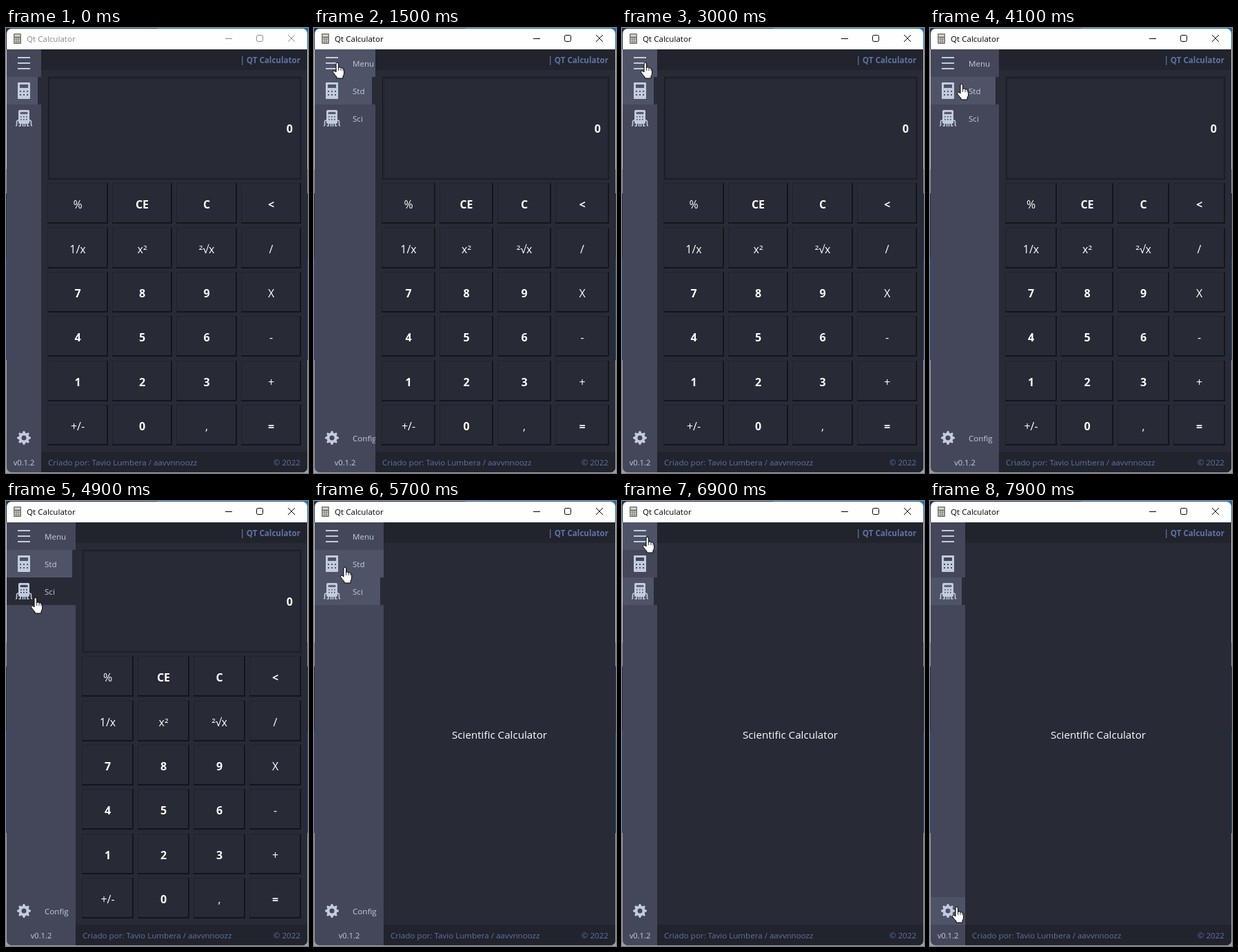
These frames come from a looping animation (438 by 646 pixels, 8000 ms). An HTML page:

```html
<!DOCTYPE html>
<html lang="pt">
<head>
<meta charset="utf-8">
<title>Qt Calculator</title>
<style>
  html, body { margin: 0; width: 100%; height: 100%; overflow: hidden; background: #1d3a5c; }
  svg { display: block; font-family: "Open Sans", "Noto Sans", sans-serif; font-size: 11.6px; }
  text { white-space: pre; }
</style>
</head>
<body>
<svg id="stage" width="438" height="646" viewBox="0 0 438 646"></svg>
<script>
const LOOP = 8000, TICK = 100, SLIDE = 280, PRESS = 25, SWITCH = 5000;
const C = {
  page: '#282a36', bar: '#21232d', side: '#44475a', lit: '#4f5368',
  icon: '#c3ccdf', label: '#6272a4', edge: '#14151b', soft: '#20222c'
};

const clicks = [
  { at: 1400, item: 'Menu', width: 100 },
  { at: 2600, item: 'Menu', width: 50 },
  { at: 3870, item: 'Menu', width: 100 },
  { at: 4900, item: 'Sci', width: 100 },
  { at: 6600, item: 'Menu', width: 50 }
];

// Each move runs from the place before it; bow bends it sideways
const moves = [
  { from: 0, to: 400, x: 33, y: 59 },
  { from: 500, to: 700, x: 33, y: 51 },
  { from: 3800, to: 4100, x: 45, y: 82 },
  { from: 4100, to: 4700, x: 42, y: 141 },
  { from: 5500, to: 5900, x: 36, y: 53, bow: 5 },
  { from: 7000, to: 7900, x: 38, y: 590, bow: 11 }
];

const menu = [['Menu', 31], ['Std', 71], ['Sci', 111], ['Config', 575]];
const keys = '% CE C < 1/x x² ²√x / 7 8 9 X 4 5 6 - 1 2 3 + +/- 0 , ='.split(' ');

const clamp = v => Math.min(1, Math.max(0, v));
const mix = (a, b, p) => a + (b - a) * p;
const outCirc = p => Math.sqrt(1 - (p - 1) ** 2);
const smooth = p => p * p * (3 - 2 * p);

const sideWidth = t => Math.round(clicks.reduce(
  (w, c) => mix(w, c.width, outCirc(clamp((t - c.at) / SLIDE))), 50));

function pointerAt(t) {
  let x = 18, y = 0;
  for (const m of moves) {
    const p = smooth(clamp((t - m.from) / (m.to - m.from)));
    x = mix(x, m.x, p) + (m.bow || 0) * Math.sin(Math.PI * p);
    y = mix(y, m.y, p);
  }
  return [Math.round(x), Math.round(y)];
}

const rect = (x, y, w, h, fill, more = '') =>
  `<rect x="${x}" y="${y}" width="${w}" height="${h}" fill="${fill}" ${more}/>`;
const path = (d, fill, more = '') => `<path d="${d}" fill="${fill}" ${more}/>`;
const text = (x, y, s, fill, more = '') =>
  `<text x="${x}" y="${y}" fill="${fill}" ${more}>${s.replace('<', '&lt;')}</text>`;
const middle = 'text-anchor="middle"', end = 'text-anchor="end"';
const bold = 'font-weight="700"';

const dots = (xs, ys, size, fill) =>
  ys.map(y => xs.map(x => rect(x, y, size, size, fill)).join('')).join('');

function gear(cx, cy) {
  const pts = [];
  for (let i = 0; i < 32; i++) {
    const tooth = i % 4 === 1 || i % 4 === 2;
    const angle = (Math.floor(i / 4) + (i % 4 - 1.5) / 4) * Math.PI / 4;
    const r = tooth ? 10 : 7.5;
    pts.push(`${(cx + r * Math.cos(angle)).toFixed(2)} ${(cy + r * Math.sin(angle)).toFixed(2)}`);
  }
  const hole = `M${cx - 3.5} ${cy}a3.5 3.5 0 1 0 7 0a3.5 3.5 0 1 0-7 0z`;
  return path(`M${pts.join('L')}Z${hole}`, C.icon, 'fill-rule="evenodd"');
}

const icons = {
  Menu: () => [42, 50, 58].map(y => rect(17, y, 18, 2, C.icon)).join(''),
  Std: bg => rect(17, 79, 18, 24, C.icon, 'rx="1"') + rect(20, 82, 12, 5, bg) +
    dots([20, 25, 30], [91, 96], 2, bg),
  Sci: bg => rect(18, 119, 16, 20, C.icon, 'rx="2"') +
    rect(20.5, 122, 11, 3, bg, 'rx="1.5"') + dots([22.5, 25.5, 28.5], [123], 1, C.icon) +
    dots([21, 25, 29], [128, 132], 1.6, bg) +
    path('M18 134Q15 134 15.5 138T14 142M34 134Q37 134 36.5 138T38 142M21 138V142H18.5M24.5 138V143M27.5 138V143M31 138V142H33.5',
      'none', `stroke="${C.icon}" stroke-width="1.6"`),
  Config: () => gear(26, 595)
};

function desktop() {
  const bands = [[31, '#c3c8cc'], [205, '#8d949c'], [240, '#24344f'], [334, '#1f4e85'], [482, '#9aa2a9']];
  return rect(0, 0, 219, 31, '#1d3a5c') + rect(219, 0, 219, 31, '#1b6fb8') +
    bands.map(([y, c]) => rect(0, y, 438, 646 - y, c)).join('');
}

function titleBar(focused) {
  const ink = focused ? '#000' : '#8a8a8a';
  const line = `stroke="${ink}"`;
  return rect(1, 1, 436, 30, '#fefefe') +
    rect(11, 8, 11, 15, '#77776f', 'rx="1"') + rect(12.5, 9.5, 8, 3, '#d7ddcf') +
    dots([12.5, 15.5, 18.5], [14.5, 17, 19.5], 1.8, '#e8e8e4') +
    text(30, 20, 'Qt Calculator', ink) +
    path('M318 15.5H328', 'none', line) +
    rect(363.5, 10.5, 9, 9, 'none', `rx="2" ${line}`) +
    path('M409 10L419 20M419 10L409 20', 'none', line);
}

function sidebar(w, active, pressed, hovered) {
  const items = menu.map(([name, y]) => {
    const dark = name === pressed, on = name === active;
    const bg = dark ? C.page : on || name === hovered ? C.lit : C.side;
    return rect(1, y, w, 40, bg) +
      (on && !dark ? rect(w - 4, y, 5, 40, C.page) : '') +
      icons[name](bg) +
      (w > 55 ? text(56, y + 25, name, C.icon) : '');
  }).join('');
  return `<clipPath id="side"><rect x="1" y="31" width="${w}" height="614"/></clipPath>` +
    `<g clip-path="url(#side)">${rect(1, 31, w, 614, C.side)}${items}` +
    text(1 + w / 2, 635, 'v0.1.2', C.icon, `${middle} font-size="11.2"`) + '</g>';
}

function keypad(w) {
  const x0 = w + 10, step = (434 - x0) / 4;
  const display = rect(x0 + 1.5, 71.5, 426 - x0, 148, 'none', `stroke="${C.edge}"`) +
    rect(x0 + 3.5, 73.5, 422 - x0, 144, 'none', `stroke="${C.soft}"`) +
    text(416, 152, '0', '#fff', `${end} ${bold} font-size="16"`);
  return display + keys.map((key, i) => {
    const left = x0 + (i % 4) * step;
    const x = Math.round(left), kw = Math.round(left + step - 6) - x;
    const y = Math.round(225.4 + Math.floor(i / 4) * 64.3);
    const weight = /^([0-9]|CE|C|<|=)$/.test(key) ? bold : '';
    return rect(x, y, kw, 59, C.edge) + rect(x, y, kw - 2, 57, C.soft) +
      rect(x + 1, y + 1, kw - 3, 56, C.page) +
      text(x + kw / 2, y + 37, key, '#fff', `${middle} font-size="16" ${weight}`);
  }).join('');
}

function page(w, scientific) {
  const x = w + 1;
  return rect(x, 31, 437 - x, 614, C.page) +
    rect(x, 31, 437 - x, 30, C.bar) + rect(x, 615, 437 - x, 30, C.bar) +
    text(427, 51, '| QT Calculator', C.label, `${end} ${bold}`) +
    text(w + 11, 635, 'Criado por: Tavio Lumbera / aavvnnoozz', C.label) +
    text(427, 635, '© 2022', C.label, end) +
    (scientific
      ? text((x + 437) / 2, 345, 'Scientific Calculator', '#fff', `${middle} font-size="15.2"`)
      : keypad(w));
}

function cursor(x, y, hand) {
  const outline = 'stroke="#000" stroke-linejoin="round"';
  const shape = hand
    ? path('M-1 1Q-1-.7.8-.7T2.6 1V7Q3 5.8 4.6 5.9T6 7.6Q6.6 6.6 8 6.9T9 8.5Q10.7 8 10.7 10.5V14Q10.7 17 9 19V22H0V20Q-3 17-5.3 13.5Q-6 11.5-4.2 11Q-2.8 11-1 13Z', '#fff', outline) +
      path('M2.6 7V11M6 8V11M9 9V11.5', 'none', 'stroke="#000" stroke-width=".8"')
    : path('M.5 .5V16L4 12.7L6.5 18.3L8.8 17.3L6.4 11.8H11.3Z', '#fff', outline);
  return `<g transform="translate(${x} ${y})">${shape}</g>`;
}

const stage = document.getElementById('stage');
const backdrop = desktop();

function draw(t) {
  const w = sideWidth(t);
  const [x, y] = pointerAt(t);
  const visible = t >= 100;
  const press = clicks.find(c => t >= c.at && t < c.at + PRESS);
  const over = visible && menu.find(([, top]) => y >= top && y < top + 40);
  const scientific = t >= SWITCH;
  stage.innerHTML = backdrop +
    '<clipPath id="window"><rect x="1" y="1" width="436" height="644" rx="7"/></clipPath>' +
    '<g clip-path="url(#window)">' +
    titleBar(t >= clicks[0].at) + page(w, scientific) +
    sidebar(w, scientific ? 'Sci' : 'Std', press && press.item, over && over[0]) + '</g>' +
    (visible ? cursor(x, y, !!over) : '');
}

// The screen refreshes ten times a second
let last = -1;
function loop() {
  const t = Math.floor(performance.now() % LOOP / TICK) * TICK;
  if (t !== last) draw(last = t);
  requestAnimationFrame(loop);
}
loop();
</script>
</body>
</html>
```
